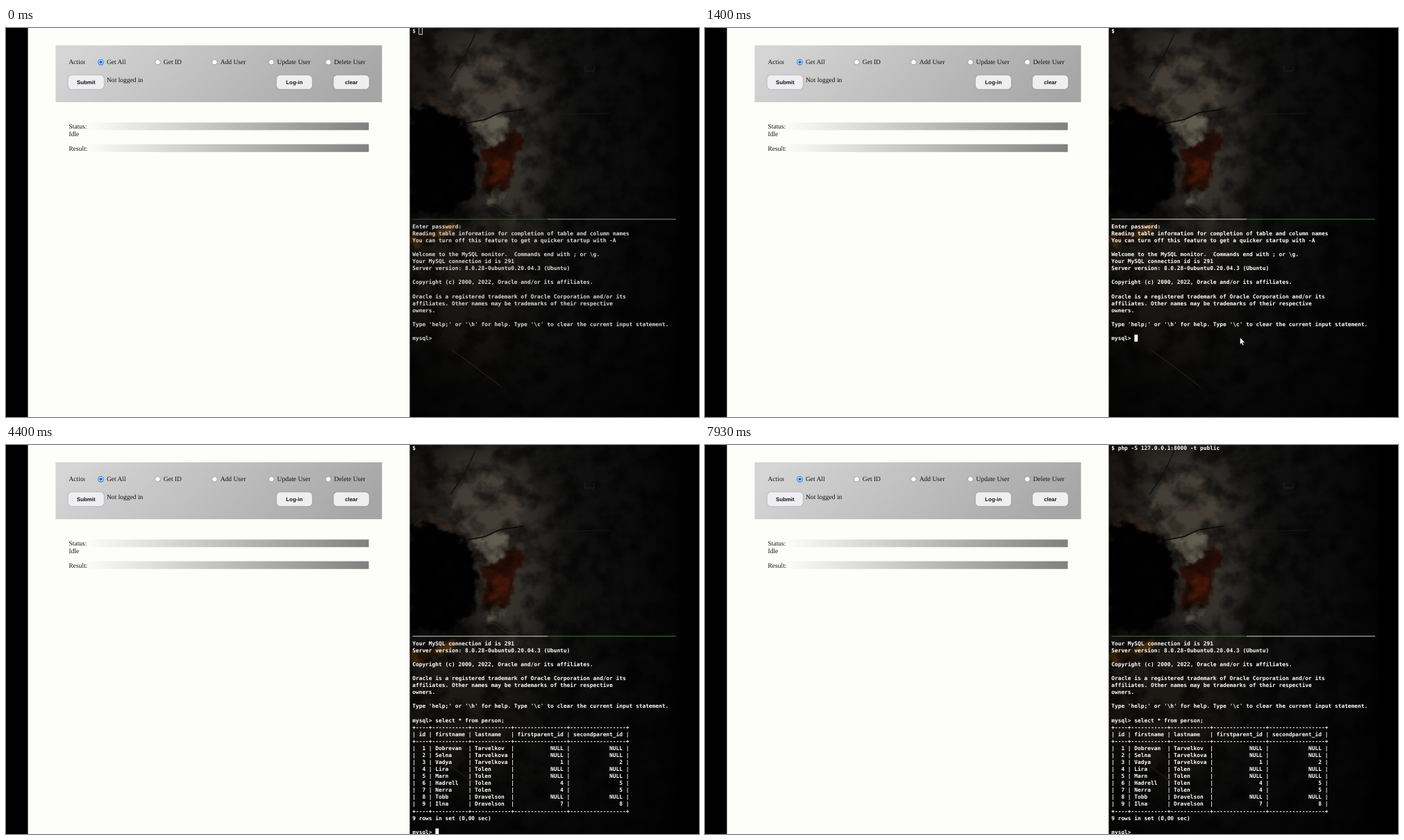
An HTML page for the animation above (8000 ms loop, 998 by 561 pixels).

```html
<!DOCTYPE html>
<html lang="en">
<head>
<meta charset="utf-8">
<title>User form and terminal</title>
<style>
  html, body { margin: 0; width: 100%; height: 100%; overflow: hidden; background: #000; }
  svg { display: block; width: 100%; height: 100%; }
  text { white-space: pre; text-rendering: geometricPrecision; }
  .page text { font: 9.52px "Liberation Serif", serif; fill: #111; }
  .page .button text { font: bold 7.85px "Liberation Sans", sans-serif; text-anchor: middle; }
  .term text { font: bold 7.87px "DejaVu Sans Mono", monospace; }
</style>
</head>
<body>
<svg viewBox="0 0 998 561">
  <defs>
    <linearGradient id="panel" gradientUnits="userSpaceOnUse" x1="190" y1="-55" x2="422" y2="187">
      <stop stop-color="#d5d5d5"/><stop offset="1" stop-color="#a6a6a6"/>
    </linearGradient>
    <linearGradient id="bar">
      <stop offset=".05" stop-color="#fdfefa"/><stop offset="1" stop-color="#808080"/>
    </linearGradient>
    <linearGradient id="wall">
      <stop stop-color="#0f0e0d"/><stop offset=".45" stop-color="#151514"/>
      <stop offset=".9" stop-color="#090909"/><stop offset="1" stop-color="#030303"/>
    </linearGradient>
    <linearGradient id="fade" x2="0" y2="1">
      <stop offset=".4" stop-opacity="0"/><stop offset="1" stop-opacity=".6"/>
    </linearGradient>
    <filter id="rough" filterUnits="userSpaceOnUse" x="560" y="-30" width="440" height="620" color-interpolation-filters="sRGB">
      <feTurbulence type="fractalNoise" baseFrequency=".07" numOctaves="4" seed="4" result="noise"/>
      <feGaussianBlur in="SourceGraphic" stdDeviation="2.5"/>
      <feDisplacementMap in2="noise" scale="20" xChannelSelector="R" yChannelSelector="G"/>
    </filter>
    <filter id="soft" filterUnits="userSpaceOnUse" x="500" y="-100" width="560" height="760" color-interpolation-filters="sRGB">
      <feGaussianBlur stdDeviation="22"/>
    </filter>
    <filter id="stain" filterUnits="userSpaceOnUse" x="581" y="0" width="389" height="561" color-interpolation-filters="sRGB">
      <feTurbulence type="fractalNoise" baseFrequency=".035" numOctaves="5" seed="11"/>
      <feColorMatrix values="0 0 0 0 0  0 0 0 0 0  0 0 0 0 0  3 0 0 0 -1.2"/>
    </filter>
    <filter id="glow" x="-20%" y="-40%" width="140%" height="190%">
      <feGaussianBlur stdDeviation="1.5"/>
    </filter>
    <clipPath id="right"><rect x="581" width="389" height="561"/></clipPath>
    <clipPath id="label"><rect x="90" y="40" width="23.7" height="18"/></clipPath>
  </defs>

  <g clip-path="url(#right)">
    <rect x="581" width="389" height="561" fill="url(#wall)"/>
    <g filter="url(#soft)">
      <path d="M615 0H740L780 100 765 300 690 300 650 130Z" fill="#35312c"/>
      <path d="M581 290H760L740 420 690 500 581 430Z" fill="#24201b"/>
      <path d="M581 0H640L620 130 581 140Z" fill="#211d19"/>
    </g>
    <g filter="url(#rough)">
      <path d="M648 66 690 38 722 50 740 86 738 112 704 120 668 132 642 100Z" fill="#443d35"/>
      <path d="M668 134 698 128 722 128 724 156 698 171Z" fill="#625c4f"/>
      <path d="M588 110 615 100 648 118 660 140 630 136Z" fill="#33271e"/>
      <path d="M581 114 612 112 650 130 672 155 680 195 674 240 640 266 581 270Z" fill="#020203"/>
      <path d="M685 174 714 167 732 143 750 164 734 182 728 222 704 246 688 236Z" fill="#280e07"/>
      <path d="M700 190 724 187 718 218 700 222Z" fill="#451708"/>
      <path d="M696 238 718 230 716 247 692 254Z" fill="#5b554a"/>
      <path d="M581 312Q640 312 655 276L640 277Q622 297 581 296Z" fill="#55330b"/>
    </g>
    <rect x="581" width="389" height="561" filter="url(#stain)" opacity=".55"/>
    <rect x="581" width="389" height="561" fill="url(#fade)"/>
    <g fill="none" stroke="#0a0908" stroke-width="1.6">
      <path d="M664 137 690 132 712 122 746 117"/>
      <path d="M640 72 662 38 676 8" stroke="#14110f"/>
      <path d="M688 260Q702 252 712 264T740 268" stroke="#302c26" stroke-width="1"/>
      <path d="M642 464 680 492 714 518" stroke="#3a2e19" stroke-width=".8"/>
      <path d="M746 120 810 124 870 123" stroke="#1e1d1b" stroke-width=".7"/>
      <path d="M834 54V62H847V55" stroke="#292827" stroke-width=".8"/>
    </g>
  </g>

  <g class="page" id="page">
    <rect x="31.6" width="549.8" height="561" fill="#fdfefa"/>
    <rect x="71.5" y="25" width="470" height="82" fill="url(#panel)"/>
    <text x="90.5" y="52.4" clip-path="url(#label)">Action:</text>
    <text x="145" y="77.8">Not logged in</text>
    <rect x="90.5" y="136.3" width="432" height="11" fill="url(#bar)"/>
    <rect x="90.5" y="167.6" width="432" height="11.2" fill="url(#bar)"/>
    <text x="90.5" y="145.2">Status:</text>
    <text x="90.5" y="156.2">Idle</text>
    <text x="90.5" y="176.5">Result:</text>
  </g>

  <g class="term">
    <path id="sepLeft" d="M585.5 275.8H780" stroke-width="1"/>
    <path id="sepRight" d="M780 275.8H965" stroke-width="1"/>
    <g id="lines"></g>
    <rect id="caret" width="4.8" height="10"/>
  </g>
  <path id="mouse" d="M0 0V10.2L2.3 8.1 4 11.7 5.6 11 4 7.5H7.1Z" fill="#fff" stroke="#111" stroke-width=".6"/>
</svg>
<script>
const $ = id => document.getElementById(id);
const LOOP = 8000, LEFT = 585.2, CHAR = 4.74, ROW = 10.07, PANE = 28;

function add(parent, tag, attrs, label) {
  const node = document.createElementNS("http://www.w3.org/2000/svg", tag);
  for (const key in attrs) node.setAttribute(key, attrs[key]);
  if (label !== undefined) node.textContent = label;
  return parent.appendChild(node);
}

// Form controls
["Get All", "Get ID", "Add User", "Update User", "Delete User"].forEach((label, i) => {
  const cx = 136.6 + i * 81.9, cy = 49.3;
  add($("page"), "circle", { cx, cy, r: 3.8, fill: "#fff", stroke: i ? "#777" : "#1672e0", "stroke-width": i ? .6 : 1.1 });
  if (!i) add($("page"), "circle", { cx, cy, r: 2.3, fill: "#1672e0" });
  add($("page"), "text", { x: cx + 8.3, y: 52.4 }, label);
});
[["Submit", 90.3, "#6f78c8"], ["Log-in", 390.3, "#777"], ["clear", 472.3, "#777"]].forEach(([label, x, shade]) => {
  const button = add($("page"), "g", { class: "button" });
  const box = { x, y: 68.8, width: 50, height: 18.8, rx: 4.5 };
  add(button, "rect", { ...box, fill: shade, filter: "url(#glow)", opacity: .7 });
  add(button, "rect", { ...box, fill: "#efeff1", stroke: "#fbfbfb", "stroke-width": .8 });
  add(button, "text", { x: x + 25, y: 80.9 }, label);
});

// Terminal content
const QUERY = "select * from person;", COMMAND = "php -S 127.0.0.1:8000 -t public";
const intro = String.raw`Enter password:
Reading table information for completion of table and column names
You can turn off this feature to get a quicker startup with -A

Welcome to the MySQL monitor.  Commands end with ; or \g.
Your MySQL connection id is 291
Server version: 8.0.28-0ubuntu0.20.04.3 (Ubuntu)

Copyright (c) 2000, 2022, Oracle and/or its affiliates.

Oracle is a registered trademark of Oracle Corporation and/or its
affiliates. Other names may be trademarks of their respective
owners.

Type 'help;' or '\h' for help. Type '\c' to clear the current input statement.
`.split("\n");

const widths = [2, 9, 10, 14, 15];
const people = `Dobrevan Tarvelkov NULL NULL
Selna Tarvelkova NULL NULL
Vadya Tarvelkova 1 2
Lira Tolen NULL NULL
Marn Tolen NULL NULL
Hadrell Tolen 4 5
Nerra Tolen 4 5
Tobb Dravelson NULL NULL
Ilna Dravelson 7 8`.split("\n").map((row, i) => [String(i + 1), ...row.split(" ")]);
const rule = "+" + widths.map(w => "-".repeat(w + 2) + "+").join("");
const tableRow = cells => "| " + cells.map((cell, i) =>
  i === 1 || i === 2 ? cell.padEnd(widths[i]) : cell.padStart(widths[i])).join(" | ") + " |";
const table = [rule, tableRow(["id", "firstname", "lastname", "firstparent_id", "secondparent_id"]), rule,
  ...people.map(tableRow), rule, "9 rows in set (0,00 sec)", ""];

// Moments of input; each one restarts the caret blink
const FOCUS = 1000, RECALL = 2700, ENTER = 2940, SWITCH = 5750, START = 6800;
const inputs = [FOCUS, RECALL, ENTER, SWITCH, START];

function paneLines(t) {
  if (t < ENTER) return [...intro, "mysql> " + (t < RECALL ? "" : QUERY)];
  return [...intro.slice(5), "mysql> " + QUERY, ...table, "mysql> "];
}

let drawnPhase = -1;
function drawTerminal(t) {
  const phase = inputs.filter(time => time <= t).length;
  const focused = t >= FOCUS, bottom = focused && t < SWITCH;
  const top = "$ " + (t < START ? "" : COMMAND), lines = paneLines(t);
  if (phase !== drawnPhase) {
    drawnPhase = phase;
    $("lines").replaceChildren();
    $("lines").setAttribute("fill", focused ? "#fff" : "#d9d9d9");
    const put = (line, row) => add($("lines"), "text", { x: LEFT, y: 6.9 + row * ROW }, line);
    put(top, 0);
    lines.forEach((line, i) => put(line, PANE + i));
    const bright = focused ? "#d0d3c6" : "#8b938c", green = focused ? "#3c7a2c" : "#31622a";
    $("sepLeft").setAttribute("stroke", bottom ? bright : green);
    $("sepRight").setAttribute("stroke", bottom ? green : bright);
  }
  const row = bottom ? PANE + lines.length - 1 : 0;
  const column = (bottom ? lines[lines.length - 1] : top).length;
  const caret = $("caret");
  caret.setAttribute("x", LEFT + column * CHAR);
  caret.setAttribute("y", row * ROW - .8);
  caret.setAttribute("fill", focused ? "#fff" : "none");
  caret.setAttribute("stroke", focused ? "none" : "#d9d9d9");
  const on = !focused || Math.floor((t - inputs[phase - 1]) / 600) % 2 === 0;
  caret.setAttribute("visibility", on ? "visible" : "hidden");
}

function ease(t, from, to) {
  const p = Math.min(1, Math.max(0, (t - from) / (to - from)));
  return p * p * (3 - 2 * p);
}

function drawMouse(t) {
  const arrive = ease(t, 600, 980), nudge = ease(t, 2150, 2400);
  const x = 640 + 130.5 * arrive - 2.2 * nudge, y = 340 + 106.3 * arrive - 8.4 * nudge;
  $("mouse").setAttribute("transform", `translate(${x} ${y})`);
  $("mouse").setAttribute("visibility", t >= 600 && t < RECALL ? "visible" : "hidden");
}

function frame() {
  const t = performance.now() % LOOP;
  drawTerminal(t);
  drawMouse(t);
  requestAnimationFrame(frame);
}
frame();
</script>
</body>
</html>
```
